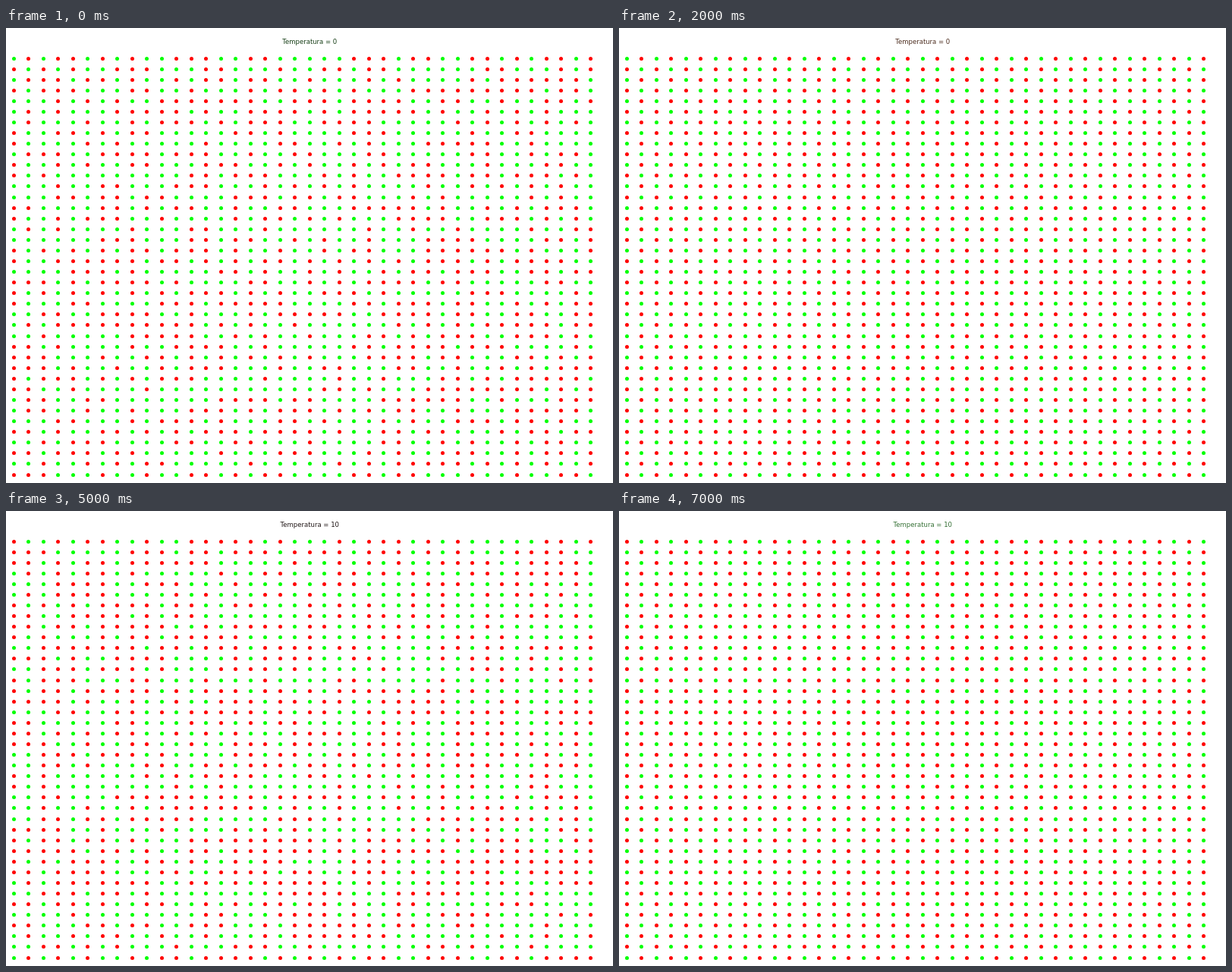
Recreate the animation shown at these times as an HTML page. Size 800 by 600 pixels, loop 8 s.

```html
<!DOCTYPE html>
<html lang="es">
<head>
<meta charset="utf-8">
<title>Temperatura</title>
<style>
html, body { margin: 0; width: 100%; height: 100%; overflow: hidden; background: #fff; }
svg { display: block; width: 800px; height: 600px; }
text { font: 8.5px "DejaVu Sans", sans-serif; text-anchor: middle; }
</style>
</head>
<body>
<svg viewBox="0 0 800 600">
  <rect width="800" height="600" fill="#fff"/>
  <g id="under"></g>
  <g id="dots"></g>
  <text id="label" x="400.3" y="21"></text>
</svg>
<script>
const N = 40, STEP = 1000, RED = '#f00', GREEN = '#0f0';
const $ = id => document.getElementById(id);
const label = $('label');

function makeDots(group) {
  return Array.from({ length: N * N }, (_, i) => {
    const dot = document.createElementNS('http://www.w3.org/2000/svg', 'circle');
    dot.setAttribute('cx', 10.5 + Math.round((i % N) * 760 / 39));
    dot.setAttribute('cy', 40.5 + Math.floor(Math.floor(i / N) * 549 / 39));
    dot.setAttribute('r', 2.5);
    group.append(dot);
    return dot;
  });
}

// Random spins from a small seeded generator
function noise(seed) {
  return Array.from({ length: N * N }, () => {
    seed = (seed + 0x6D2B79F5) | 0;
    let t = Math.imul(seed ^ (seed >>> 15), 1 | seed);
    t = (t + Math.imul(t ^ (t >>> 7), 61 | t)) ^ t;
    return (t ^ (t >>> 14)) >>> 31;
  });
}

// Antiferromagnetic order: neighbours have opposite spins
const order = phase =>
  Array.from({ length: N * N }, (_, i) => (i % N + Math.floor(i / N) + phase) % 2);

const hot0 = noise(17), hot10 = noise(58);
const cold0 = order(1), cold10 = order(0);

const steps = [
  { temp: 0, spins: hot0, ink: '#143c14' },
  { temp: 0, spins: cold0, ink: '#50281e', before: hot0 },
  { temp: 0, spins: cold0, ink: '#4a2a1c' },
  { temp: 0, spins: cold0, ink: '#46281c' },
  { temp: 0, spins: cold0, ink: '#5a2814' },
  { temp: 10, spins: hot10, ink: '#1e1414' },
  { temp: 10, spins: cold10, ink: '#5a4632', before: hot10 },
  { temp: 10, spins: cold10, ink: '#326e32' }
];

const under = makeDots($('under')), dots = makeDots($('dots'));
const paint = (list, spins) =>
  list.forEach((dot, i) => dot.setAttribute('fill', spins[i] ? GREEN : RED));

let shown = -1;
function draw(ms) {
  const k = Math.floor(ms / STEP) % steps.length;
  if (k === shown) return;
  shown = k;
  const { temp, spins, ink, before } = steps[k];
  paint(dots, spins);
  // Flipped spins keep a thin rim of their former colour
  $('under').setAttribute('display', before ? 'inline' : 'none');
  if (before) paint(under, before);
  label.textContent = 'Temperatura = ' + temp;
  label.setAttribute('fill', ink);
}

const start = performance.now();
function tick() {
  draw(performance.now() - start);
  requestAnimationFrame(tick);
}
tick();
</script>
</body>
</html>
```
